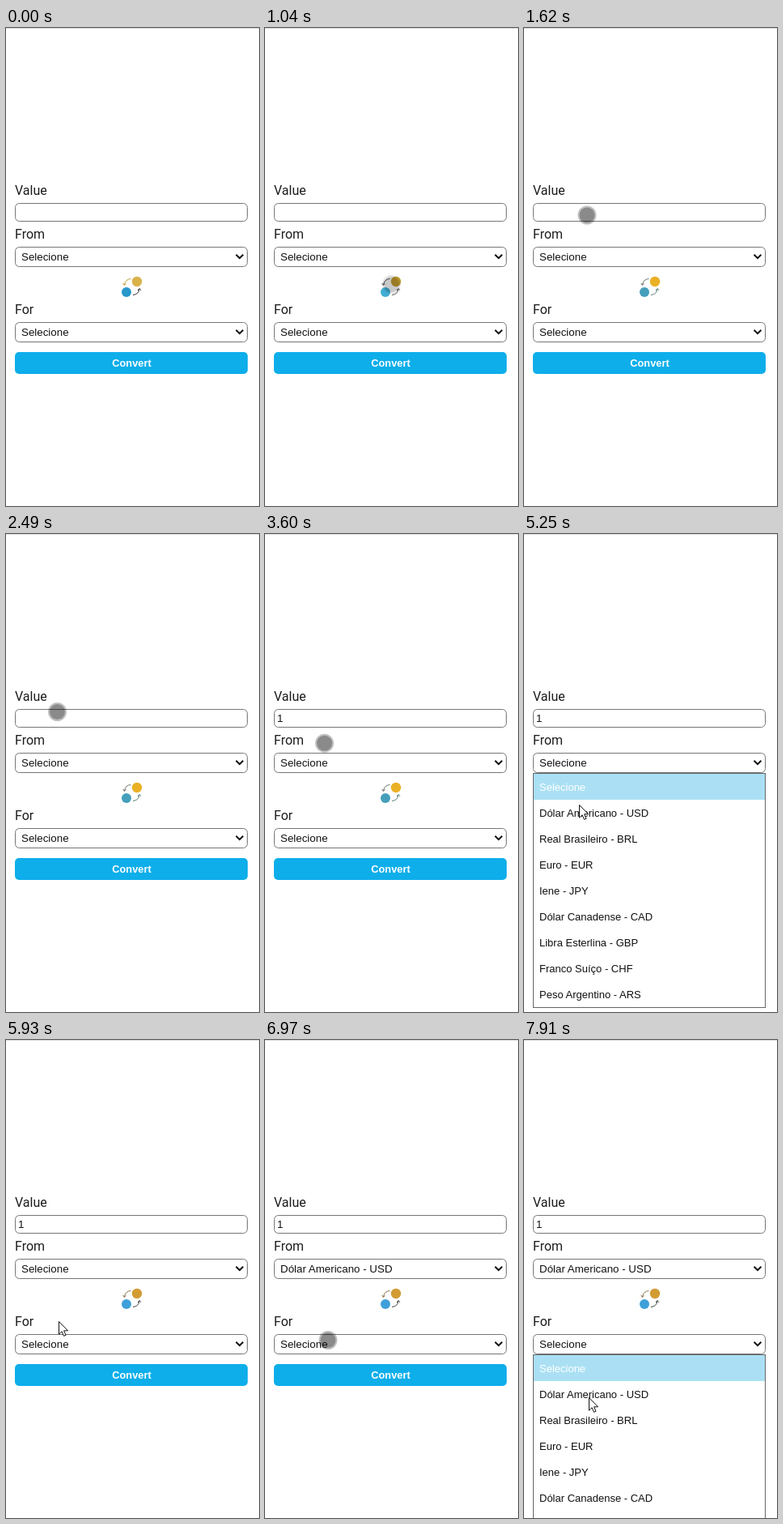
Animation, 313 px wide and 590 px high, one loop 8 s. Source, as an HTML page:

```html
<!DOCTYPE html>
<html lang="en">
<head>
<meta charset="utf-8">
<title>Currency converter</title>
<style>
  html, body { margin: 0; width: 100%; height: 100%; overflow: hidden; background: #fff; }
  svg { display: block; width: 100vw; height: 100vh; }
  text { font-family: "Liberation Sans", Arial, sans-serif; font-size: 13.333px; fill: #111; }
  .label { font-family: Roboto, sans-serif; font-size: 16px; fill: #1c1c1c; }
  .field { fill: #fff; stroke: #767676; }
  .option { font-size: 13px; }
  .button { font-size: 12.8px; font-weight: bold; fill: #fff; text-anchor: middle; }
  .chevron { fill: none; stroke: #111; stroke-width: 2; }
  .turn { fill: none; stroke-width: 1; }
</style>
</head>
<body>
<svg id="stage" viewBox="0 0 313 590" xmlns="http://www.w3.org/2000/svg"></svg>
<script>
const LOOP = 8000;
const stage = document.getElementById("stage");
const options = [
  "Selecione", "Dólar Americano - USD", "Real Brasileiro - BRL", "Euro - EUR", "Iene - JPY",
  "Dólar Canadense - CAD", "Libra Esterlina - GBP", "Franco Suíço - CHF", "Peso Argentino - ARS"
];

// start, end, steps, x, y, optional control point
const moves = [
  [600, 700, 4, 248.5, 504.5],
  [900, 1040, 5, 156.5, 316.5],
  [1240, 1340, 4, 92.5, 242.5],
  [1580, 1680, 4, 63.5, 219.5],
  [3360, 3760, 13, 57, 283.5, 90, 250],
  [5050, 5250, 7, 68, 334],
  [5510, 5550, 2, 65, 347],
  [6150, 6670, 16, 78, 370.5, 134.5, 352],
  [7370, 7550, 6, 80, 409],
  [7770, 7910, 5, 80, 441]
];

function add(parent, tag, attrs = {}, content = "") {
  const node = document.createElementNS("http://www.w3.org/2000/svg", tag);
  for (const key in attrs) node.setAttribute(key, attrs[key]);
  node.textContent = content;
  parent.append(node);
  return node;
}

const set = (node, attrs) => {
  for (const key in attrs) node.setAttribute(key, attrs[key]);
};
const show = (node, on) => set(node, { visibility: on ? "visible" : "hidden" });
const within = (t, from, to) => t >= from && t < to;

const label = (y, text) => add(stage, "text", { x: 11, y, class: "label" }, text);
const box = (y, height) =>
  add(stage, "rect", { x: 11.5, y: y + 0.5, width: 287, height, rx: 5, class: "field" });

function select(y) {
  box(y, 24);
  add(stage, "path", { d: `M284.6 ${y + 9.7}l4.4 4.4l4.4-4.4`, class: "chevron" });
  return add(stage, "text", { x: 19, y: y + 17 }, options[0]);
}

function popup(y) {
  const group = add(stage, "g", { transform: `translate(0 ${y})` });
  add(group, "rect", { x: 11.5, y: 0.5, width: 287, height: 289, fill: "#fff", stroke: "#666" });
  const bar = add(group, "rect", { x: 12, width: 286, height: 32, fill: "#abe0f4" });
  const rows = options.map((name, i) =>
    add(group, "text", { x: 19, y: 22 + 32 * i, class: "option" }, name));
  return (open, active) => {
    show(group, open);
    set(bar, { y: 1 + 32 * active });
    rows.forEach((row, i) => { row.style.fill = i === active ? "#fff" : "#111"; });
  };
}

add(stage, "rect", { width: 313, height: 590, fill: "#fff" });
add(stage, "rect", { width: 313, height: 1, fill: "#dedede" });

label(206, "Value");
box(216, 22);
const value = add(stage, "text", { x: 15, y: 232 }, "1");
const caret = add(stage, "rect", { y: 220, width: 1, height: 15, fill: "#111" });

label(260, "From");
const fromText = select(270);

const coin = add(stage, "circle", { cx: 162, cy: 313, r: 6.2 });
const token = add(stage, "circle", { cx: 149, cy: 326, r: 6 });
const turns = [
  "M154.5 309.5Q147.5 310 146.5 317M144.8 315l1.6 2.6l2-2.2",
  "M157 329.5Q164 329 165 322M163 324l2.2-2.6l1.6 2.4"
].map(d => add(stage, "path", { d, class: "turn" }));

label(353, "For");
select(363);
add(stage, "rect", { x: 11, y: 400, width: 288, height: 27, rx: 5, fill: "#0eaeea" });
add(stage, "text", { x: 155.5, y: 418, class: "button" }, "Convert");

const sliver = add(stage, "rect", { x: 11, y: 295, width: 288, height: 1, fill: "#aaa" });
const fromPopup = popup(295);
const forPopup = popup(388);

const touch = add(stage, "g");
const ring = add(touch, "circle", { fill: "#000" });
const core = add(touch, "circle", { fill: "#000" });
const arrow = add(stage, "path", {
  d: "M.5.5V16.2L4.1 12.8L6.5 18.4L9 17.3L6.6 11.8H11.5Z",
  fill: "#fff", stroke: "#111", "stroke-linejoin": "round"
});

function pointer(t) {
  let x = 307.5, y = 583.5;
  for (const [start, end, steps, toX, toY, midX, midY] of moves) {
    if (t < start) break;
    const done = Math.floor((t - start) / (end - start) * (steps - 1) + 1e-6) + 1;
    const k = Math.min(1, done / steps);
    const mix = (a, b, c) => c === undefined
      ? a + (b - a) * k
      : (1 - k) ** 2 * a + 2 * k * (1 - k) * c + k * k * b;
    [x, y] = [mix(x, toX, midX), mix(y, toY, midY)];
  }
  return [x, y];
}

function iconColours(t) {
  if (t < 900) return ["#d9b24a", "#2798cb", "#c5a040", "#333"];
  if (t < 1240) return ["#c69f31", "#42aed4", "#555", "#555"];
  if (t < 4620) return ["#eab126", "#459fbb", "#6c7668", "#5c8078"];
  return ["#d29c33", "#3fa0d9", "#8a7650", "#444"];
}

function drawPointer(t) {
  const [x, y] = pointer(t);
  const isArrow = within(t, 5050, 6150) && y > 296 || t >= 7370 && y > 389;
  const pressed = within(t, 1860, 2000) || within(t, 4440, 4720) || within(t, 6870, 6970);
  const faint = within(t, 1040, 1240);
  show(arrow, isArrow);
  show(touch, t >= 150 && !isArrow);
  set(arrow, { transform: `translate(${x} ${y})` });
  set(touch, { transform: `translate(${x} ${y})` });
  set(ring, { r: pressed ? 12 : 11.5, opacity: faint ? 0.1 : pressed ? 0.16 : 0.25 });
  set(core, { r: 9.5, opacity: faint ? 0.12 : pressed ? 0.45 : 0.28 });
}

function draw(t) {
  const typed = t >= 3020;
  show(value, typed);
  set(caret, { x: typed ? 22 : 15 });
  show(caret, within(t, 2000, 2490) || within(t, 2980, 3520) || within(t, 4030, 4540));
  fromText.textContent = options[t >= 5960 ? 1 : 0];
  show(sliver, within(t, 4580, 4620));
  fromPopup(within(t, 4620, 5930), t >= 5790 ? 1 : 0);
  forPopup(t >= 7010, 0);

  const [gold, blue, upper, lower] = iconColours(t);
  set(coin, { fill: gold });
  set(token, { fill: blue });
  set(turns[0], { stroke: upper });
  set(turns[1], { stroke: lower });
  drawPointer(t);
}

const begin = performance.now();
function tick() {
  draw((performance.now() - begin) % LOOP);
  requestAnimationFrame(tick);
}
tick();
</script>
</body>
</html>
```
